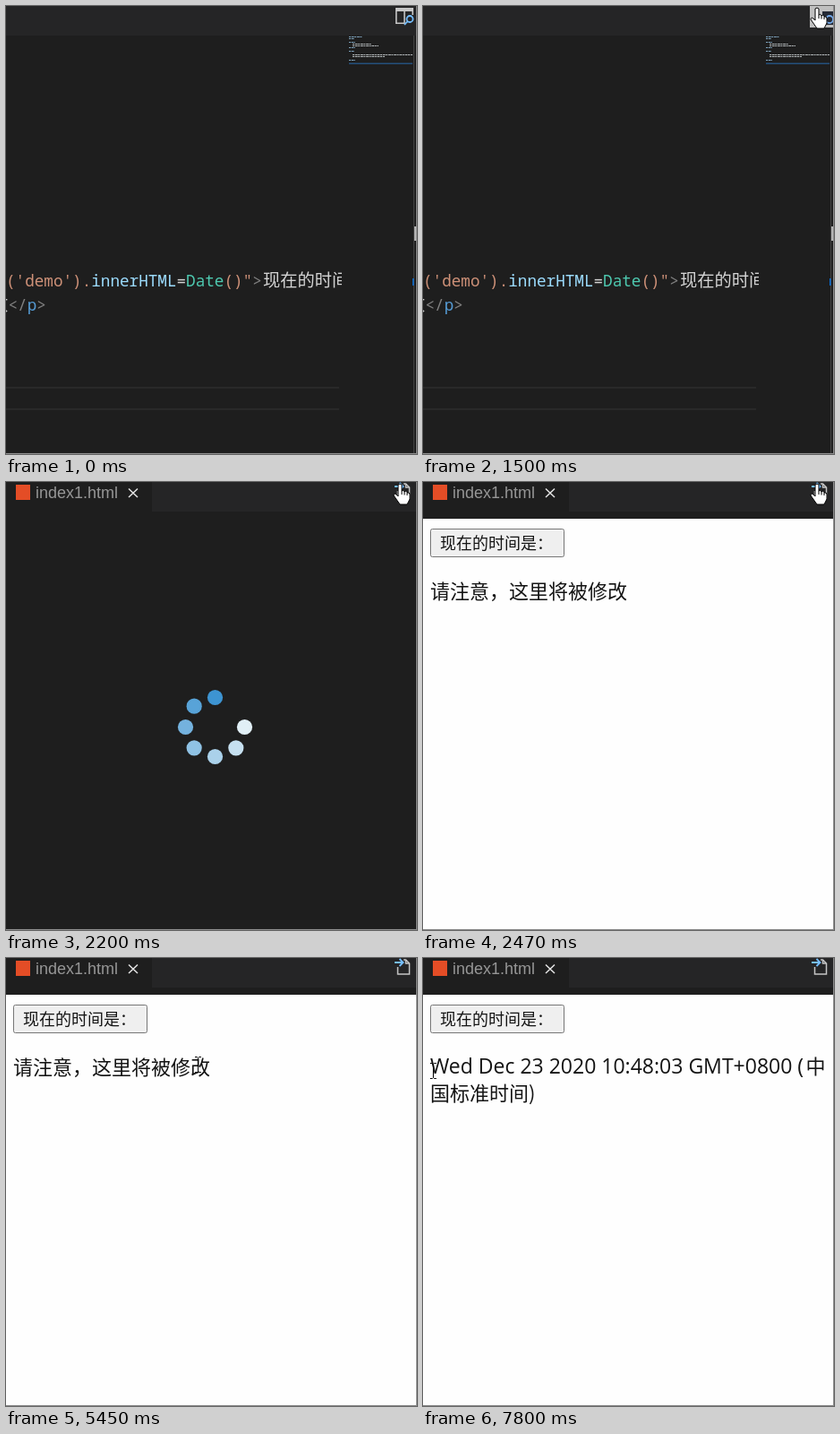
An HTML page with a canvas that plays this animation: 459x500 px, repeating every 8 s.

```html
<!DOCTYPE html>
<html lang="zh-CN">
<head>
<meta charset="utf-8">
<style>
html, body { margin: 0; width: 100%; height: 100%; overflow: hidden; background: #1e1e1e; }
canvas { display: block; }
</style>
</head>
<body>
<canvas width="459" height="500"></canvas>
<script>
const c = document.querySelector('canvas').getContext('2d', { alpha: false });
const CJK = '"Noto Sans CJK SC", "Noto Sans CJK", sans-serif';
const MONO = '500 17.65px "Noto Sans Mono", monospace';
const INK = '#141414';
const LOOP = 8000;

const HAND = new Path2D('M-2 9V0Q0-2 2 0V7Q4 5 5 8Q8 6 8 9Q11 8 11 11V16L8 22H0L-7 12Q-7 9-4 11L-2 13Z');
const FINGERS = new Path2D('M2 7V11M5 8V11.5M8 9V12');
const ARROW = new Path2D('M0 0V17L4 13L7 20L10 19L7 12H12Z');
const IBEAM = new Path2D('M-3.5-8.5H-1L0-7.5L1-8.5H3.5M0-7.5V7.5M-3.5 8.5H-1L0 7.5L1 8.5H3.5');

// Pointer moves: begin, end, steps, control point, destination
const START = [-12, 506];
const MOVES = [
  [300, 1200, 8, [215, 250], [440, 3]],
  [2590, 2950, 4, [442, 54], [434, 104]],
  [3100, 4120, 9, [250, 474], [23.5, 116]],
  [4520, 5450, 8, [120, 117], [214.5, 119]],
  [5570, 6530, 8, [390, 190], [70, 66]],
  [7200, 7800, 5, [41, 97], [11.5, 126]]
];

function rect(color, x, y, w, h) {
  c.fillStyle = color;
  c.fillRect(x, y, w, h);
}

function text(s, x, y, font, color) {
  c.font = font;
  c.fillStyle = color;
  c.fillText(s, x, y);
  return x + c.measureText(s).width;
}

function line(d, color, width = 1) {
  c.strokeStyle = color;
  c.lineWidth = width;
  c.stroke(new Path2D(d));
}

function disc(x, y, r, color) {
  c.fillStyle = color;
  c.beginPath();
  c.arc(x, y, r, 0, 7);
  c.fill();
}

function pointerAt(t) {
  let from = START;
  for (const [begin, end, steps, via, to] of MOVES) {
    if (t < begin) break;
    const step = Math.floor((t - begin) / ((end - begin) / (steps - 1)) + 1e-6) + 1;
    const k = Math.min(1, step / steps), a = from;
    from = [0, 1].map(i => (1 - k) ** 2 * a[i] + 2 * k * (1 - k) * via[i] + k * k * to[i]);
  }
  return from;
}

function drawPointer(t, [x, y]) {
  if (t < 300) return;
  const inEditor = t < 1650;
  const overText = inEditor ? y > 33 && x < 375 : y > 104 && y < 136;
  c.save();
  c.translate(x, y);
  c.lineWidth = 1;
  if (overText) {
    c.strokeStyle = inEditor ? '#eee' : '#000';
    c.stroke(IBEAM);
  } else {
    const shape = y < 24 && x > 430 ? HAND : ARROW;
    c.fillStyle = '#fff';
    c.strokeStyle = '#000';
    c.fill(shape);
    c.stroke(shape);
    if (shape === HAND) c.stroke(FINGERS);
  }
  c.restore();
}

function drawMinimap() {
  c.setLineDash([2, .7, 3, .5]);
  const rows = [[34, 383, 15], [36, 383, 6], [40, 383, 7], [42, 387, 21], [44, 387, 29],
    [46, 383, 7], [50, 383, 6], [54, 387, 67], [56, 387, 36], [60, 383, 7]];
  for (const [y, x, w] of rows) line(`M${x} ${y + .5}h${w}`, w > 20 ? '#b4b9bb' : '#7fa3bd');
  c.setLineDash([]);
  rect('#24507c', 383, 63.5, 71, 1.5);
}

function drawCode() {
  c.save();
  c.beginPath();
  c.rect(0, 34, 375, 460);
  c.clip();
  let x = 0;
  for (const [s, color] of [["('demo').", '#ce9178'], ['innerHTML', '#9cdcfe'], ['=', '#d4d4d4'],
    ['Date', '#4ec9b0'], ['()"', '#ce9178'], ['>', '#808080']]) x = text(s, x, 313, MONO, color);
  const font = '300 19.3px ' + CJK;
  text('现在的时间是', 287, 313, font, '#d4d4d4');
  text('改', -17, 340, font, '#d4d4d4');
  x = text('</', 2.5, 340, MONO, '#808080');
  x = text('p', x, 340, MONO, '#569cd6');
  text('>', x, 340, MONO, '#808080');
  c.restore();
}

function drawEditor(t) {
  rect('#1e1e1e', 0, 0, 459, 500);
  rect('#252526', 0, 0, 459, 33);
  drawCode();
  rect('#292929', 0, 425, 372, 2);
  rect('#292929', 0, 449, 372, 2);
  drawMinimap();
  rect('#444', 455, 33, 1, 466);
  rect('#b5b5b5', 456, 246, 2, 16);
  rect('#0a6fd6', 454, 304, 1.5, 8);
  if (t < 1350) {
    rect('#c5c5c5', 435, 2, 20, 4);
    line('M435.8 4V19.2H445V4M454.2 4V10', '#c5c5c5', 1.6);
    line('M454.5 14.5A3.5 3.5 0 1 0 447.5 14.5A3.5 3.5 0 1 0 454.5 14.5M448.5 17L445 21', '#75beff', 1.8);
  } else {
    rect('#c0c0c0', 432, 0, 26, 24);
    rect('#252a35', 446, 6, 12, 15);
    line('M458 15A4 4 0 1 0 450 15A4 4 0 1 0 458 15', '#75a9e8', 1.8);
  }
}

function drawSpinner(t) {
  const head = Math.floor((t - 2200) / 125 + 1e-6);
  for (let i = 0; i < 7; i++) {
    const a = -Math.PI / 2 + (head - i) * Math.PI / 4, k = i / 6;
    const mix = (p, q) => Math.round(p + (q - p) * k);
    disc(233.5 + 33 * Math.cos(a), 273.5 + 33 * Math.sin(a), 8.6,
      `rgb(${mix(61, 225)},${mix(148, 239)},${mix(210, 246)})`);
  }
}

function drawPage(t, [x, y]) {
  const hover = x > 8 && x < 158 && y > 52 && y < 84;
  const pressed = t >= 6800 && t < 6920;
  c.beginPath();
  c.roundRect(8.5, 52.5, 149, 31, 2);
  c.fillStyle = pressed ? '#f5f5f5' : hover ? '#e5e5e5' : '#efefef';
  c.fill();
  c.lineWidth = 1;
  c.strokeStyle = pressed ? '#8d8d8d' : hover ? '#4f4f4f' : '#767676';
  c.stroke();
  text('现在的时间是：', 19, 75, '300 18px ' + CJK, INK);
  const big = '300 22px ' + CJK;
  if (t < 6920) {
    text('请注意，这里将被修改', 8, 130, big, INK);
  } else {
    text('Wed Dec 23 2020 10:48:03 GMT+0800 (', 8, 129, '23px "Open Sans", sans-serif', INK);
    text('中', 427.5, 129, big, INK);
    text('国标准时间)', 8, 159, big, INK);
  }
}

function drawPreview(t, pointer) {
  const loading = t >= 2050 && t < 2470;
  rect('#1e1e1e', 0, 0, 459, 500);
  rect('#252526', 163, 0, 296, 33);
  rect('#e44d26', 11, 3, 16, 17);
  text('index1.html', 33, 18, '18px "Liberation Sans", sans-serif', '#969696');
  line('M137 7.5L147 17M147 7.5L137 17', '#e4e4e4', 1.5);
  line('M437.5 10V18H450.5V6L446.5 2H444M446.5 2V6H450.5', '#c5c5c5', 1.5);
  line('M434 5H443M439.5 1L443.5 5L439.5 9', '#75beff', 1.8);
  if (loading) return drawSpinner(t);
  rect('#fefefe', 0, 41, 459, 459);
  if (t >= 2470) drawPage(t, pointer);
}

function frame() {
  const t = performance.now() % LOOP, pointer = pointerAt(t);
  if (t < 1650) drawEditor(t);
  else drawPreview(t, pointer);
  rect('#8c8c8c', 458, 0, 1, 500);
  rect('#8c8c8c', 0, 499, 459, 1);
  drawPointer(t, pointer);
  requestAnimationFrame(frame);
}
frame();
</script>
</body>
</html>
```
